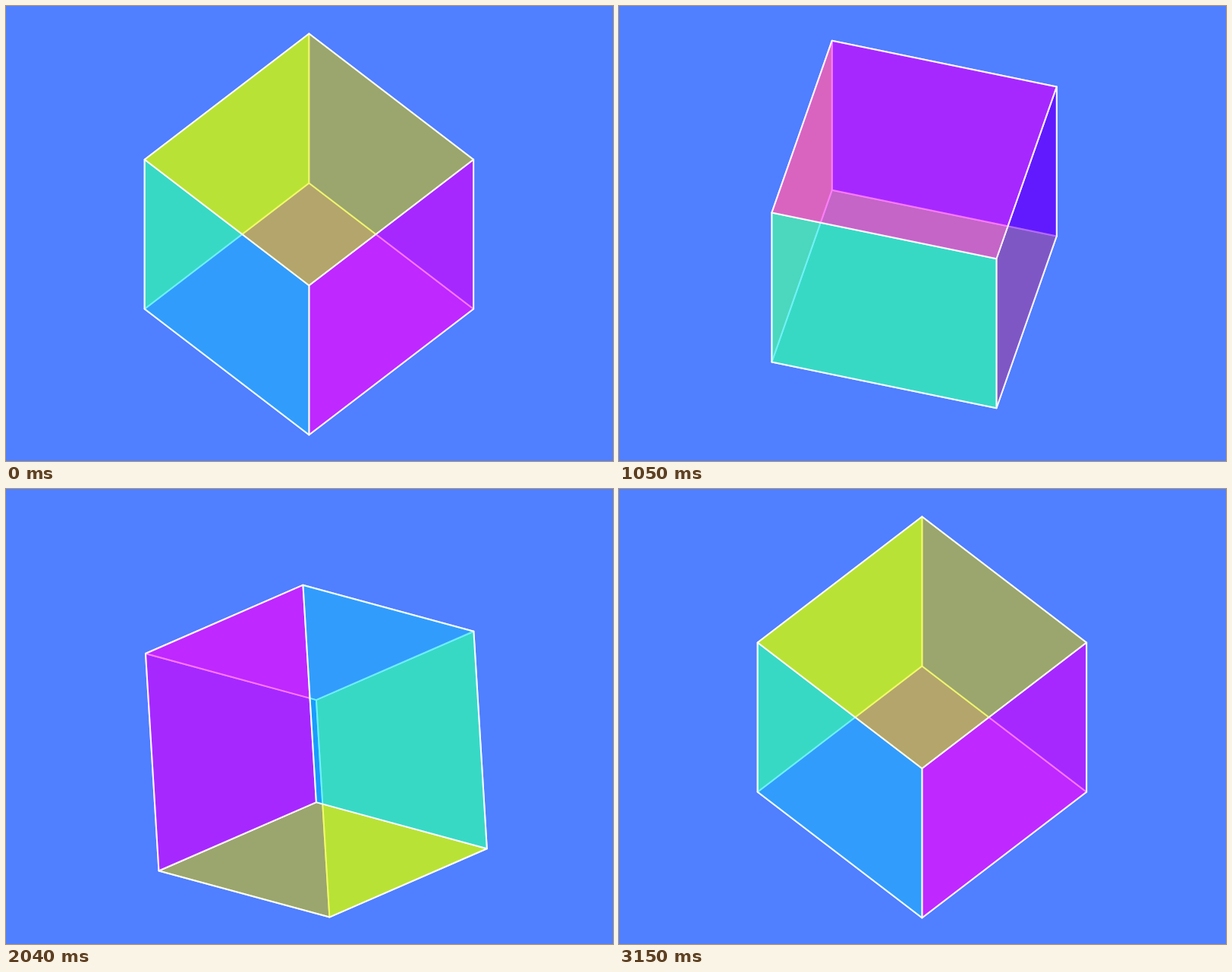
Write an HTML page with a canvas that moves like this. It is 800 px wide and 600 px high and loops after 3600 ms.

```html
<!DOCTYPE html>
<html lang="en">
<head>
<meta charset="utf-8">
<title>Turning glass cube</title>
<style>
  html, body { margin: 0; width: 100%; height: 100%; overflow: hidden; background: #507fff; }
  canvas { display: block; }
</style>
</head>
<body>
<canvas id="stage" width="800" height="600"></canvas>
<script>
const ctx = document.getElementById('stage').getContext('2d');
const LOOP = 3600, SLOT = 900, STEP = 30, STEPS = 15;
const HALF = 153.25, TILT = 50 * Math.PI / 180, ALPHA = 0.57;

// Pivot offset from the cube centre, along the three body axes
const PIVOT = [50, -76, -56];

// Centre of the cube at each rest
const RESTS = [[399.4, 301], [400.7, 299.9], [400.9, 300], [400.6, 300.4]];

// Turning axis in body coordinates, and angle in degrees
const MOVES = [
  { axis: [0, 0, 1], turn: 90 },
  { axis: [0, 1, 0], turn: 90 },
  { axis: [1, 1, 1], turn: 120 },
  { axis: [1, 1, 1], turn: 120 }
];

const FACES = [
  { axis: 0, sign: 1, rgb: '234,248,0' },
  { axis: 0, sign: -1, rgb: '132,4,252' },
  { axis: 1, sign: 1, rgb: '253,29,255' },
  { axis: 1, sign: -1, rgb: '152,249,28' },
  { axis: 2, sign: 1, rgb: '6,232,252' },
  { axis: 2, sign: -1, rgb: '30,0,255' }
];

const mix = (a, b, p) => a.map((v, i) => v + (b[i] - v) * p);
const dot = (a, b) => a[0] * b[0] + a[1] * b[1] + a[2] * b[2];
const cross = (a, b) => [
  a[1] * b[2] - a[2] * b[1],
  a[2] * b[0] - a[0] * b[2],
  a[0] * b[1] - a[1] * b[0]
];

// Body coordinates to view space: x right, y up, z towards the viewer
const toView = (basis, k) =>
  [0, 1, 2].map(i => basis[0][i] * k[0] + basis[1][i] * k[1] + basis[2][i] * k[2]);

function rotate(v, n, angle) {
  const c = Math.cos(angle), s = Math.sin(angle);
  const side = cross(n, v), along = dot(n, v) * (1 - c);
  return v.map((x, i) => x * c + side[i] * s + n[i] * along);
}

function turned(basis, move, p) {
  const n = toView(basis, move.axis), len = Math.hypot(...n);
  const unit = n.map(x => x / len);
  return basis.map(v => rotate(v, unit, move.turn * p * Math.PI / 180));
}

const q = Math.SQRT1_2, st = Math.sin(TILT), ct = Math.cos(TILT);
const poses = [[[0, ct, st], [q, -q * st, q * ct], [-q, -q * st, q * ct]]];
MOVES.forEach((m, i) => poses.push(turned(poses[i], m, 1)));

function drawFace(basis, centre, face) {
  const u = (face.axis + 1) % 3, w = (face.axis + 2) % 3;
  ctx.beginPath();
  for (const [a, b] of [[1, 1], [1, -1], [-1, -1], [-1, 1]]) {
    const k = [];
    k[face.axis] = face.sign * HALF;
    k[u] = a * HALF;
    k[w] = b * HALF;
    const v = toView(basis, k);
    ctx.lineTo(centre[0] + v[0], centre[1] - v[1]);
  }
  ctx.closePath();
  ctx.fillStyle = `rgba(${face.rgb},${ALPHA})`;
  ctx.fill();
  ctx.stroke();
}

function draw(time) {
  const t = time % LOOP, i = Math.floor(t / SLOT);
  const p = Math.min(STEPS, Math.floor((t - i * SLOT) / STEP)) / STEPS;
  const basis = turned(poses[i], MOVES[i], p);

  // The pivot travels straight, so the centre swings out in an arc
  const straight = mix(toView(poses[i], PIVOT), toView(poses[i + 1], PIVOT), p);
  const swing = toView(basis, PIVOT).map((v, k) => v - straight[k]);
  const rest = mix(RESTS[i], RESTS[(i + 1) % 4], p);
  const centre = [rest[0] + swing[0], rest[1] - swing[1]];

  ctx.fillStyle = '#507fff';
  ctx.fillRect(0, 0, 800, 600);
  ctx.strokeStyle = 'rgba(255,255,255,0.85)';
  ctx.lineWidth = 2;
  ctx.lineJoin = 'round';
  const depth = f => f.sign * basis[f.axis][2];
  [...FACES].sort((a, b) => depth(a) - depth(b)).forEach(f => drawFace(basis, centre, f));
}

const start = performance.now();
function tick() {
  draw(performance.now() - start);
  requestAnimationFrame(tick);
}
tick();
</script>
</body>
</html>
```
